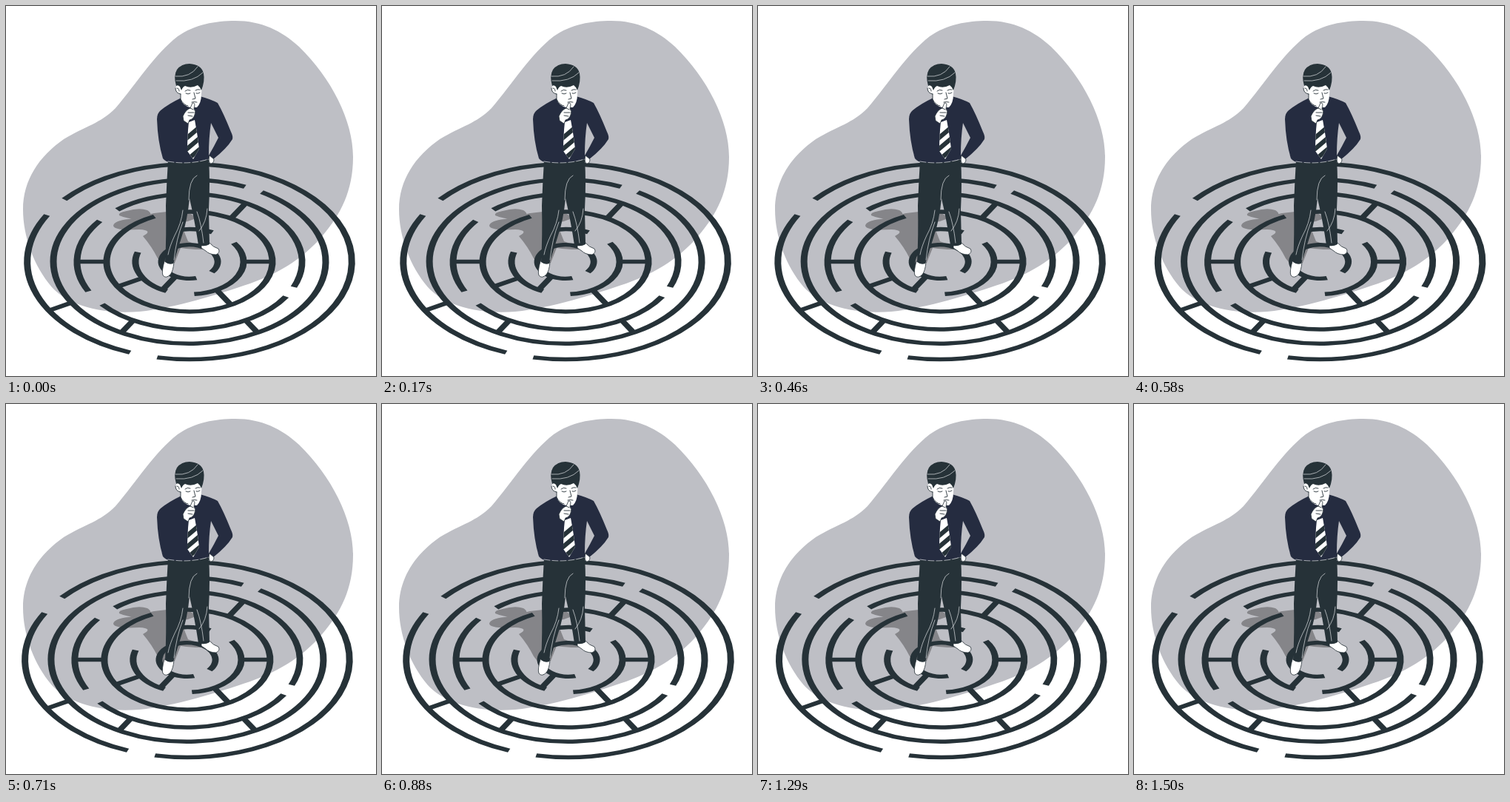
Recreate the animation shown at these times as an HTML page. Size 500 px wide and 500 px high, loop 1540 ms.

```html
<!DOCTYPE html>
<html lang="en">
<head>
<meta charset="utf-8">
<style>
  html, body { margin: 0; width: 100%; height: 100%; overflow: hidden; background: #fff; }
  svg { display: block; width: 100%; height: 100%; }
  .dark { fill: #263238; }
  .shirt { fill: #252c40; }
  .skin { fill: #fff; stroke: #263238; stroke-width: .8; stroke-linejoin: round; }
  .line { fill: none; stroke: #263238; stroke-width: .9; stroke-linecap: round; }
  .crease { fill: none; stroke: #dfe1e4; stroke-width: .7; stroke-linecap: round; }
  #maze { fill: none; stroke: #263238; stroke-width: 9; }
</style>
</head>
<body>
<svg viewBox="0 0 500 500">
  <path fill="#bebfc5" d="M310 20C345 20 372 33 396 55C440 98 469 155 469 204C469 250 452 282 428 310C405 338 372 360 330 375C285 390 230 408 180 413C130 417 85 405 62 380C38 352 23 312 23 275C23 235 45 203 78 180C106 163 129 158 148 138C178 103 200 66 232 41C255 25 283 20 310 20Z"/>

  <g fill="#858589">
    <path d="M153 283Q151 279 163 277Q180 272 191 276Q199 281 192 284L181 288Q164 288 153 283Z"/>
    <path d="M145 297Q146 290 166 288Q185 283 200 280L226 277Q256 278 254 288Q245 292 236 293L246 318L271 327Q268 331 236 327L228 347L212 350L205 341Q197 325 185 311Q200 303 180 302Q147 304 145 297Z"/>
  </g>

  <path id="maze"/>

  <!-- feet and trousers -->
  <path class="skin" d="M214 345L227 346Q226 358 222 363Q216 369 212 364Q210 359 214 345Z"/>
  <path class="skin" d="M264 320L275 320Q280 326 287 328Q290 333 284 336Q275 336 270 331L264 327Z"/>
  <path class="dark" d="M219 209Q247 214 274 207Q276 238 274 275L275 322Q268 326 260 323Q255 290 248 260Q245 290 238 310L226 348Q220 350 215 346Q217 310 216 270Q217 240 219 209Z"/>
  <path class="crease" d="M247 262Q247 234 258 229M239 276Q237 294 228 310Q221 325 219 336M227 343Q230 315 239 292M258 278Q264 294 267 320M272 274Q271 292 261 304"/>

  <!-- shirt, arms and tie -->
  <path class="shirt" fill-rule="evenodd" d="M237 124Q220 132 209 141Q204 145 204 153Q205 183 212 206Q216 211 222 211Q248 214 273 207L280 207Q298 193 306 180Q307 176 304 170Q294 145 286 131Q277 126 262 122L250 136ZM277 158L287 178Q281 190 274 202Q274 178 277 158Z"/>
  <path class="crease" d="M219 210Q247 215 274 207" stroke-dasharray="8 3"/>
  <path class="skin" d="M275 202L281 207Q281 213 276 213Q273 209 275 202Z"/>
  <clipPath id="tie"><path d="M247 157L255 154Q259 175 261 193L253 207L245 196Q245 175 247 157Z"/></clipPath>
  <g clip-path="url(#tie)">
    <path fill="#fff" d="M240 150h25v60h-25z"/>
    <path stroke="#263238" stroke-width="6" d="M240 182l26 -22m-26 37l26 -22m-26 37l26 -22"/>
  </g>

  <!-- head and hand -->
  <path fill="#fff" d="M236 106Q229 106 229 113Q231 119 236 119L236 126Q239 135 249 137L258 137Q264 131 264 119L265 106Z"/>
  <path class="line" d="M236 119Q229 118 229 111M231 111Q234 111 234 115M236 119V126Q240 134 246 135"/>
  <path class="dark" d="M230 108Q226 94 231 86Q237 78 248 78Q264 79 267 91Q269 101 264 114Q263 110 259 107Q250 112 242 108Q239 109 237 114L235 109Q232 106 230 108Z"/>
  <path class="crease" d="M229 95Q249 97 259 82M230 101Q253 103 266 90"/>
  <path class="line" d="M242 115Q245 112 249 114M256 114Q259 112 262 113M243 118Q246 120 249 118M257 118Q260 119 262 117M254 117L256 125L252 126M251 130Q255 129 258 130"/>
  <path class="skin" d="M240 155L239 149Q243 140 249 138L252 131Q254 130 255 133L254 139Q257 142 255 147Q253 153 248 154L246 159Z"/>
  <path class="line" d="M249 138L253 140M246 144L254 144M246 148L252 149"/>
</svg>
<script>
const maze = document.getElementById("maze");
const polar = (r, deg) => {
  const a = deg * Math.PI / 180;
  return `${r * Math.cos(a)} ${r * Math.sin(a)}`;
};
const arc = (r, from, to) =>
  `M${polar(r, from)}A${r} ${r} 0 ${+(to - from > 180)} 1 ${polar(r, to)}`;
const spoke = (r1, r2, deg) => `M${polar(r1, deg)}L${polar(r2, deg)}`;

// Each ring, inside out: radius, gaps as [start, end] degrees,
// and cross walls to the next ring in multiples of 30 degrees
const rings = [
  { r: 38, gaps: [[38, 76]], spokes: [4] },
  { r: 73, gaps: [[85, 115], [197, 250], [295, 325]], spokes: [0, 2, 5] },
  { r: 112, gaps: [[245, 262]], spokes: [6, 10] },
  { r: 152, gaps: [[22, 31], [141, 154], [217, 230]], spokes: [2, 4] },
  { r: 184, gaps: [[294, 302]], spokes: [5] },
  { r: 219.3, gaps: [[101.5, 111.5], [208.5, 219.5]], spokes: [] }
];

maze.setAttribute("d", rings.map(({ r, gaps, spokes }, i) => {
  const walls = gaps.map(([, end], k) =>
    arc(r, end, k + 1 < gaps.length ? gaps[k + 1][0] : gaps[0][0] + 360));
  return walls.concat(spokes.map(n => spoke(r, rings[i + 1].r, n * 30))).join("");
}).join(""));

const LOOP = 1540, PERIOD = 1500, STEP = 1000 / 24, LEAD = 28;

// Shake with alternating sides that swells to 4 px and dies down again
function swing(i) {
  const fromEnd = Math.min(i, 10 - i);
  return fromEnd ? (-1) ** i * Math.min(4, 2 ** (fromEnd - 1)) : 0;
}

function draw(now) {
  // 24 steps per second, with step times rounded to 10 ms
  const t = Math.floor((now % LOOP + 0.01) / 10) * 10;
  const step = Math.floor((t + 4.99) / STEP);
  const pos = (step * STEP + LEAD) % PERIOD / PERIOD * 10;
  const i = Math.floor(pos);
  const x = swing(i) + (swing(i + 1) - swing(i)) * (pos - i);
  maze.setAttribute("transform", `translate(${248.2 + x} 345.5) scale(1 .602)`);
}

const start = performance.now();
function tick() {
  draw(performance.now() - start);
  requestAnimationFrame(tick);
}
tick();
</script>
</body>
</html>
```
